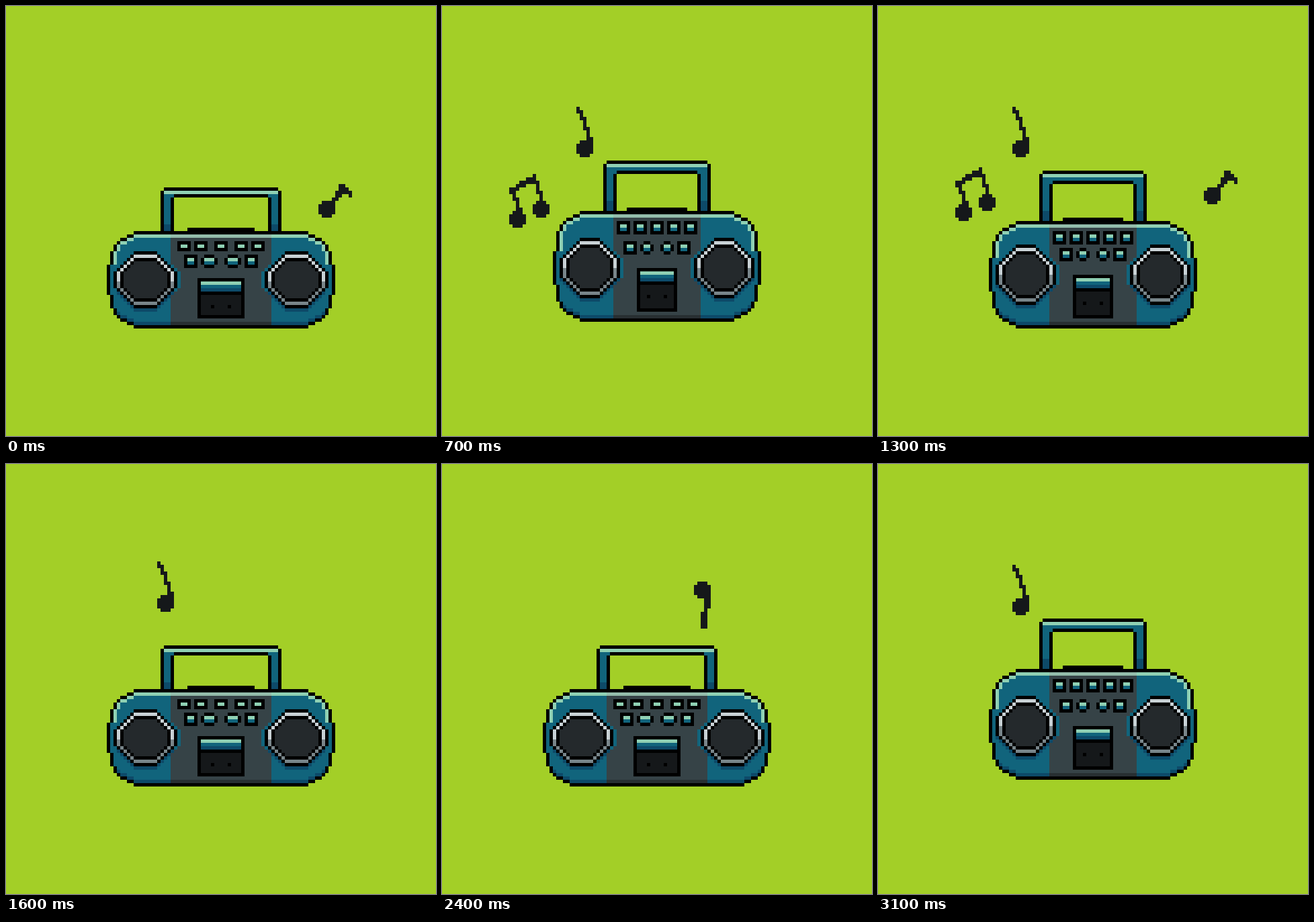
Recreate the animation shown at these times as an HTML page with a canvas. Size 640x640 px, loop 3200 ms.

```html
<!DOCTYPE html>
<html lang="en">
<head>
<meta charset="utf-8">
<title>Bouncing boombox</title>
<style>
html, body { margin: 0; height: 100%; overflow: hidden; background: #a3cf27; }
canvas { display: block; width: 100vw; height: 100vh; image-rendering: pixelated; }
</style>
</head>
<body>
<canvas id="stage" width="640" height="640"></canvas>
<script>
const GRID = 128, CENTRE = GRID / 2, CELL = 5, STEP = 100, STEPS = 32;
const C = {
  lime: '#a3cf27', black: '#000', ink: '#15181a', teal: '#11647c', navy: '#0d4a69',
  mint: '#8fd0b3', panel: '#364347', panelDark: '#282f32', panelLight: '#93bcab',
  cone: '#24292c', chrome: '#c8d1d5', steel: '#78858a'
};
const { round, floor, ceil, min, max, abs, hypot } = Math;

// Masks are predicates over cells.
const rowMask = (x, y, w, h, inset) => (px, py) => {
  const row = py - y;
  if (row < 0 || row >= h) return false;
  const cut = inset(row, h - 1 - row);
  return px >= x + cut && px < x + w - cut;
};
const around = (x, y) => [[x, y], [x - 1, y], [x + 1, y], [x, y - 1], [x, y + 1]];
const erode = m => (x, y) => around(x, y).every(p => m(...p));
const dilate = m => (x, y) => around(x, y).some(p => m(...p));

// The whole figure follows from its vertical stretch (2 to 4), its base line and a small lift.
function renderBoombox({ stretch, base, lift }) {
  const canvas = document.createElement('canvas');
  canvas.width = canvas.height = GRID;
  const g = canvas.getContext('2d');
  const rect = (color, x, y, w, h) => { g.fillStyle = color; g.fillRect(x, y, w, h); };
  const wide = (color, x, y, h) => rect(color, x, y, GRID - 2 * x, h);
  const pair = (color, x, y, w, h) => {
    rect(color, x, y, w, h);
    rect(color, GRID - x - w, y, w, h);
  };

  const height = floor(22 + 3.5 * stretch) + lift;
  const top = base - height, left = 24 + 3 * stretch;
  const panel = round(34 + left / 2);
  const paint = (mask, color) => {
    for (let y = top; y < base; y++)
      for (let x = left; x < GRID - left; x++)
        if (mask(x, y)) rect(typeof color === 'function' ? color(x, y) : color, x, y, 1, 1);
  };

  // handle
  const hx = panel - 3, rise = 9 + 2 * stretch, hy = top - rise, bar = min(2, stretch - 1);
  wide(C.black, hx + 1, hy, 1);
  pair(C.black, hx, hy + 1, 1, rise - 1);
  pair(C.teal, hx + 1, hy + 1, 2, rise - 1);
  pair(C.navy, hx + 1, top - stretch, 2, stretch);
  wide(C.teal, hx + 1, hy + 1, bar + 1);
  wide(C.mint, hx + 1, hy + 1, 1);
  wide(C.black, hx + 4, hy + 1 + bar, 1);
  pair(C.black, hx + 3, hy + 2 + bar, 1, rise - bar - 2);
  wide(C.black, 44 + left / 3, top - 1, 1);

  // case
  const shoulder = round(height * 0.35), foot = floor(height * 0.35);
  const corner = stretch > 3 ? 7 : 8;
  const curve = (row, rows) => row < rows ? max(1, round(corner * 0.74 ** row)) : 0;
  const body = rowMask(left, top, GRID - 2 * left, height,
    (above, below) => curve(above, shoulder) + curve(below, foot));
  const inner = erode(body);
  paint(body, C.black);
  paint(inner, (x, y) => {
    const middle = x >= panel && x < GRID - panel;
    const lit = !inner(x, y - 1) || !inner(x - 1, y) || !inner(x + 1, y);
    if (lit && y < top + shoulder) return middle ? C.panelLight : C.mint;
    if (!inner(x, y + 1) && y > base - 7) return middle ? C.panelDark : C.navy;
    return middle ? C.panel : C.teal;
  });

  // speakers
  const lowerY = top + stretch + 5 + lift;
  const sw = round(20.2 - 1.5 * stretch), sh = 13 + stretch, mid = lowerY + sh / 2;
  const cut = round(sw * 0.3);
  for (const x of [left + 3, GRID - left - 3 - sw]) {
    const ring = rowMask(x, lowerY, sw, sh, (above, below) => max(0, cut - min(above, below)));
    const rim = dilate(ring), well = erode(ring), shadow = dilate(rim);
    paint((px, py) => shadow(px, py) && inner(px, py), (px, py) => py < mid + 3 ? C.teal : C.navy);
    paint(rim, C.black);
    paint(ring, (px, py) => py < mid ? C.chrome : C.steel);
    paint(well, C.black);
    paint(erode(well), C.cone);
  }

  // keys, placed by their distance from the centre line
  const pitch = 6.75 - 0.56 * stretch;
  const keys = (distance, y, h, half = 1.9, notch = 0) => {
    const x = round(CENTRE - distance - half), w = round(CENTRE - distance + half) - x;
    pair(C.black, x + notch, y, w - 2 * notch, h);
    pair(C.black, x, y + notch, w, h - 2 * notch);
    pair(C.teal, x + 1, y + 1, w - 2, h - 2);
    pair(C.mint, x + 1, y + 1, w - 2, 1);
  };
  for (let k = 0; k < 3; k++) keys(k * pitch, top + 3, stretch + 1);
  keys(1.6 * pitch, lowerY, 4);
  keys(0.62 * pitch, lowerY, 4, 2.1, 1);

  // cassette door
  const dx = 47 + left / 3, dy = top + 10 + 2 * stretch + lift, dh = 10 + stretch;
  wide(C.black, dx, dy, dh);
  [C.mint, C.teal, C.navy].forEach((color, i) => wide(color, dx + 1, dy + 1 + i, 1));
  wide(C.ink, dx + 1, dy + 5, dh - 6);
  pair(C.black, 61, dy + round(dh * 0.64), 1, 1);
  return canvas;
}

const poses = [
  { stretch: 2, base: 96, lift: 0 },
  { stretch: 3, base: 96, lift: 0 },
  { stretch: 4, base: 94, lift: 0 },
  { stretch: 3, base: 94, lift: 1 }
].map(renderBoombox);

const ctx = document.getElementById('stage').getContext('2d');
ctx.imageSmoothingEnabled = false;

// Pixel line, two cells tall.
function line(x0, y0, x1, y1) {
  const n = ceil(max(abs(x1 - x0), abs(y1 - y0)));
  for (let i = 0; i <= n; i++)
    ctx.fillRect(round(x0 + (x1 - x0) * i / n), round(y0 + (y1 - y0) * i / n), 1, 2);
}
function head(x, y) {
  ctx.fillRect(x + 1, y, 3, 5);
  ctx.fillRect(x, y + 1, 5, 3);
}

// Drifts over the four steps of a note's life.
const LIFE = 4;
const hop = i => [-min(2 * i, 5), i && i - 2];
const climb = i => { const d = max(i, 2 * i - 2); return [d, -d]; };

const notes = [
  { x: 45, y: 29, drift: hop, starts: [4, 10, 16, 28], shape() {
    line(0.45, 0, 3.95, 10);
    head(0, 10);
    ctx.fillRect(4, 10, 1, 4);
  } },
  { x: 25, y: 49, drift: hop, starts: [4, 12, 26], shape() {
    line(0, 4.3, 7, 0);
    line(1, 5, 3, 11);
    line(7.4, 1, 9.2, 7);
    head(0, 11);
    head(7, 8);
  } },
  { x: 93, y: 53, drift: climb, starts: [0, 10, 17, 25], shape() {
    line(7, 0, 9, 2);
    line(6, 0, 4, 5);
    line(5, 2, 7, 1);
    head(0, 5);
  } },
  { x: 71, y: 39, drift: climb, starts: [8, 21], shape() {
    head(0, 0);
    line(3, 5, 2, 12);
    line(4, 4, 2.6, 12);
  } }
];

function draw(step) {
  ctx.setTransform(CELL, 0, 0, CELL, 0, 0);
  ctx.fillStyle = C.lime;
  ctx.fillRect(0, 0, GRID, GRID);
  ctx.drawImage(poses[step % poses.length], 0, 0);
  ctx.fillStyle = C.ink;
  for (const { x, y, drift, starts, shape } of notes)
    for (const start of starts) {
      const age = step - start;
      if (age < 0 || age >= LIFE) continue;
      const [dx, dy] = drift(age);
      ctx.setTransform(CELL, 0, 0, CELL, (x + dx) * CELL, (y + dy) * CELL);
      shape();
    }
}

const origin = performance.now();
function tick() {
  draw(floor((performance.now() - origin) / STEP) % STEPS);
  requestAnimationFrame(tick);
}
tick();
</script>
</body>
</html>
```
